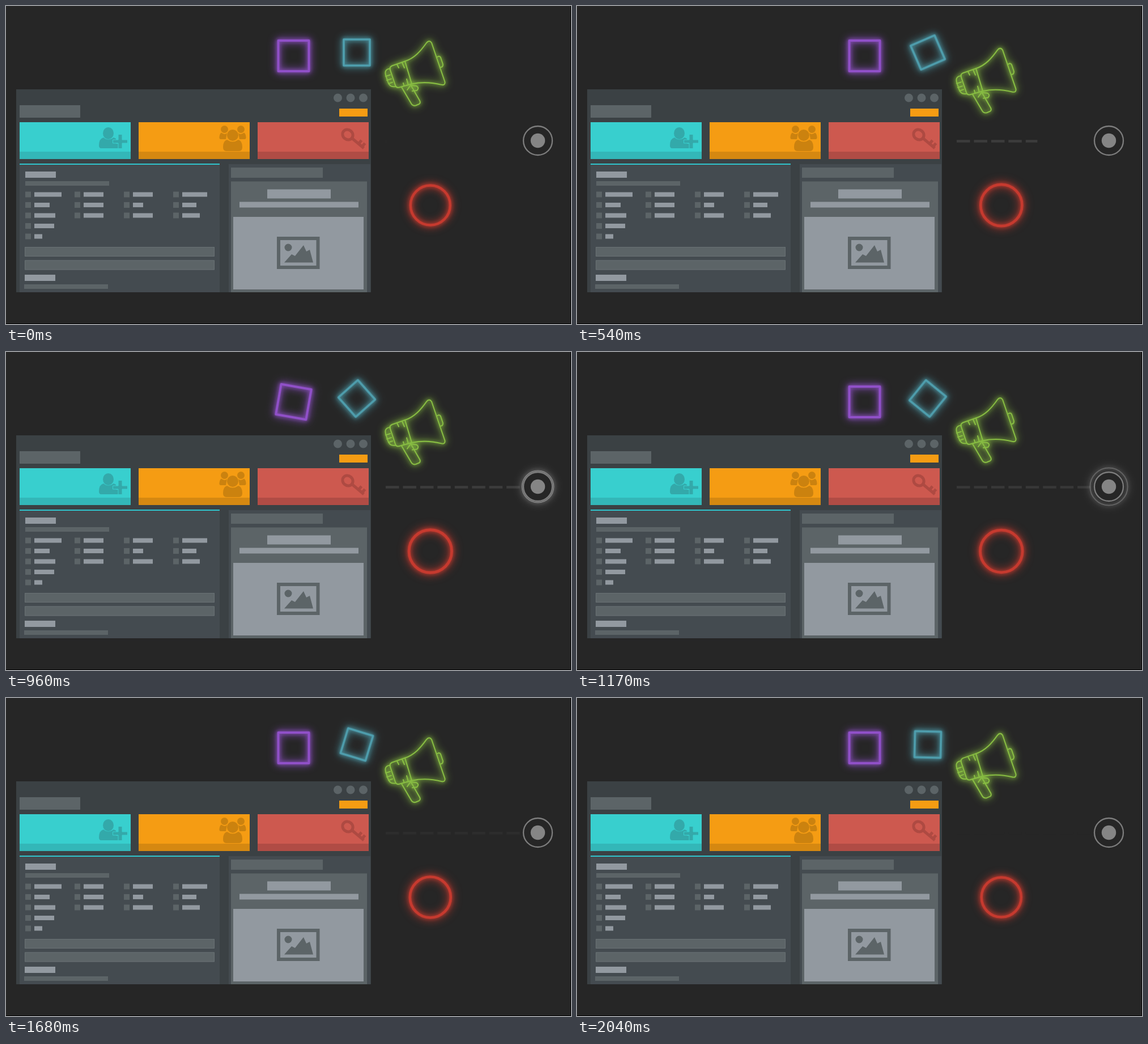
Animation of 997x561 px, one loop 2.07 s. Source, as an HTML page:

```html
<!DOCTYPE html>
<html lang="en">
<head>
<meta charset="utf-8">
<title>Dashboard with neon icons</title>
<style>
html, body { margin: 0; width: 100%; height: 100%; overflow: hidden; background: #262626; }
svg { display: block; width: 997px; height: 561px; }
.neon { fill: none; stroke: currentColor; stroke-linejoin: round; stroke-linecap: round;
  filter: drop-shadow(0 0 3px currentColor) drop-shadow(0 0 7px currentColor); }
.d { fill: #5c6467; }
.l { fill: #9299a0; }
</style>
</head>
<body>
<svg viewBox="0 0 997 561">
  <path d="M0 560.5H996.5V0" fill="none" stroke="#000"/>

  <!-- window -->
  <path d="M18 147H644V505H18z" fill="#3b4144"/>
  <path d="M24 279H377V505H24zM393 279H643V505H393z" fill="#444b50"/>
  <path d="M24 278H377V280H24z" fill="#2fc4cc"/>
  <path d="M588 181H638V195H588z" fill="#f59c13"/>
  <g id="bars"></g>
  <g class="d">
    <circle cx="585.5" cy="162" r="7.5"/>
    <circle cx="608" cy="162" r="7.5"/>
    <circle cx="630.5" cy="162" r="7.5"/>
  </g>
  <path d="M33.5 425.5H367.5V441.5H33.5zM33.5 449H367.5V465H33.5z" fill="none" stroke="#697174"/>

  <!-- picture placeholder -->
  <path d="M481 410H550.5V461H481z" fill="none" stroke="#5c6467" stroke-width="6"/>
  <circle class="d" cx="498" cy="426" r="6.5"/>
  <path class="d" d="M491 452.500L504 438L510 441L525 422L530 433L536 430L542 452.500z"/>

  <!-- cards -->
  <g id="cards"></g>
  <g fill="#33a9aa">
    <ellipse cx="180.500" cy="224.500" rx="9.500" ry="10.500"/>
    <path d="M172 232Q180 239 190 232L194 234V243H198V251H168Q164 251 164 246Q164 234 172 232z"/>
    <path d="M198 226.500H205V236H214.500V242H205V251.500H198V242H188.500V236H198z" stroke="#38cfce"/>
  </g>
  <g fill="#cb820f">
    <circle cx="385.500" cy="217.500" r="6.500"/>
    <circle cx="414.500" cy="217.500" r="6.500"/>
    <path d="M380 223.500Q386 228 390 224L388 235H379Q376 235 376.500 231Q377 225 380 223.500zM420 223.500Q414 228 410 224L412 235H421Q424 235 423.500 231Q423 225 420 223.500z"/>
    <circle cx="400" cy="228" r="10"/>
    <path d="M390 236Q400 243 410 236Q417 238 417 249Q417 256 411 256H389Q383 256 383 249Q383 238 390 236z"/>
  </g>
  <g transform="translate(603 227) rotate(40)" fill="none" stroke="#ae4a42" stroke-width="5">
    <ellipse rx="9.500" ry="8.500"/>
    <path d="M9 0H37M25 0V-8M33 0V-8"/>
  </g>

  <!-- record button -->
  <path id="dashes" fill="none" stroke="#3c3c3c" stroke-width="4.500" stroke-dasharray="23.500 6.950"/>
  <circle id="ring" class="neon" cx="938.500" cy="237.500" color="#8a8a8a" stroke-width="2"/>
  <circle cx="938.500" cy="237.500" r="25.500" fill="#262626" stroke="#7d7d7d" stroke-width="2.300"/>
  <circle cx="938.500" cy="237.500" r="12.700" fill="#858585"/>

  <!-- neon icons -->
  <path id="purple" class="neon" color="#9050c8" stroke-width="4" d="M-27-27H27V27H-27z"/>
  <path id="blue" class="neon" color="#4f9fae" stroke-width="3.600" d="M-23-23H23V23H-23z"/>
  <circle id="red" class="neon" color="#c63a2f" stroke-width="4.500" r="35"/>
  <g id="horn" class="neon" color="#88bd43" stroke-width="2.100">
    <path d="M704 97.500C721 92 732 79 742 65Q747 59 751 65L774.500 134Q775 140 769 139Q741 132 716 137.500z"/>
    <path d="M761 90Q765 87 767 91L771 103Q771 108 767 108"/>
    <path d="M704 97.500L681 105.500Q676 108 678 113L687 140Q689 145 694 143.500L716 137.500"/>
    <path d="M678 110.500C669 111 668 117 671 125L674 134C677 142 681 143 688 142M670 124L678 121.500M672 131L680 128.500M675 137L682 134.500"/>
    <path d="M690 103L693 109M699 100L703 109M707 129L709.500 138M701 136L702.500 141"/>
    <path d="M698 143L715 172Q718 177 723 175.500L729 173Q732 171 730 167L714 139"/>
    <path d="M708 148L713 141M717 150L725 149Q730 144 724 141L716 140"/>
  </g>
</svg>
<script>
const $ = id => document.getElementById(id);
const rect = (x, y, w, h, attr) => `<rect x="${x}" y="${y}" width="${w}" height="${h}" ${attr}/>`;
const dark = (...box) => rect(...box, 'class="d"');
const light = (...box) => rect(...box, 'class="l"');

const rows = [[48, 35, 35, 44], [27, 35, 18, 25], [37, 35, 35, 31], [35], [14]];
const list = rows.flatMap((row, r) => row.map((w, c) => {
  const x = 34 + c * 87, y = 327.5 + r * 18.5;
  return dark(x, y, 10, 10) + light(x + 16, y + 1, w, 8);
}));

$('bars').innerHTML = [
  dark(24, 175, 107, 22),
  light(34, 292, 54, 11), dark(34, 309, 148, 8), ...list,
  dark(33, 425, 335, 17), dark(33, 448.5, 335, 17),
  light(33, 474, 54, 11), dark(32, 491, 148, 8),
  dark(397, 285, 162, 18), dark(397, 309.5, 240, 195.5),
  light(461, 323.5, 112, 16), light(412, 345.5, 210, 10), light(401, 372, 230, 128)
].join('');

$('cards').innerHTML = [['#38cfce', '#33b7b8'], ['#f59c13', '#d58811'], ['#cd594f', '#b04c45']]
  .map(([top, base], i) => rect(24 + i * 210, 205, 196, 65, `fill="${top}"`) +
    rect(24 + i * 210, 257, 196, 13, `fill="${base}"`)).join('');

const LOOP = 2070, STEP = 30, PEAK = 980;
const clamp = v => Math.max(0, Math.min(1, v));
const ramp = (t, from, to) => clamp((t - from) / (to - from));
const set = (id, name, value) => $(id).setAttribute(name, value);

function draw(t) {
  const swell = t < PEAK ? t / PEAK : (LOOP - t) / (LOOP - PEAK);
  const shake = -10 * ramp(t, 570, 720) + 20 * ramp(t, 720, 960) - 10 * ramp(t, 960, 1140);

  set('purple', 'transform', `translate(507.5 88) rotate(${shake})`);
  set('blue', 'transform', `translate(619 82) rotate(${-90 * t / LOOP})`);
  set('red', 'transform', `translate(748.8 351.5) scale(${1 + 0.08 * swell})`);
  set('horn', 'transform', `translate(0 ${23 * swell})`);

  set('dashes', 'd', `M670 238.500H${Math.max(670, Math.min(907, 645 + 0.31 * t))}`);
  set('dashes', 'opacity', 1 - ramp(t, PEAK, LOOP));

  set('ring', 'r', 25.5 + 13 * ramp(t, 860, 1390));
  set('ring', 'opacity', t < 860 ? 0 : 1 - ramp(t, 870, 1640));
}

const start = performance.now();
function tick() {
  const t = (performance.now() - start) % LOOP;
  draw(Math.floor(t / STEP) * STEP);
  requestAnimationFrame(tick);
}
tick();
</script>
</body>
</html>
```
